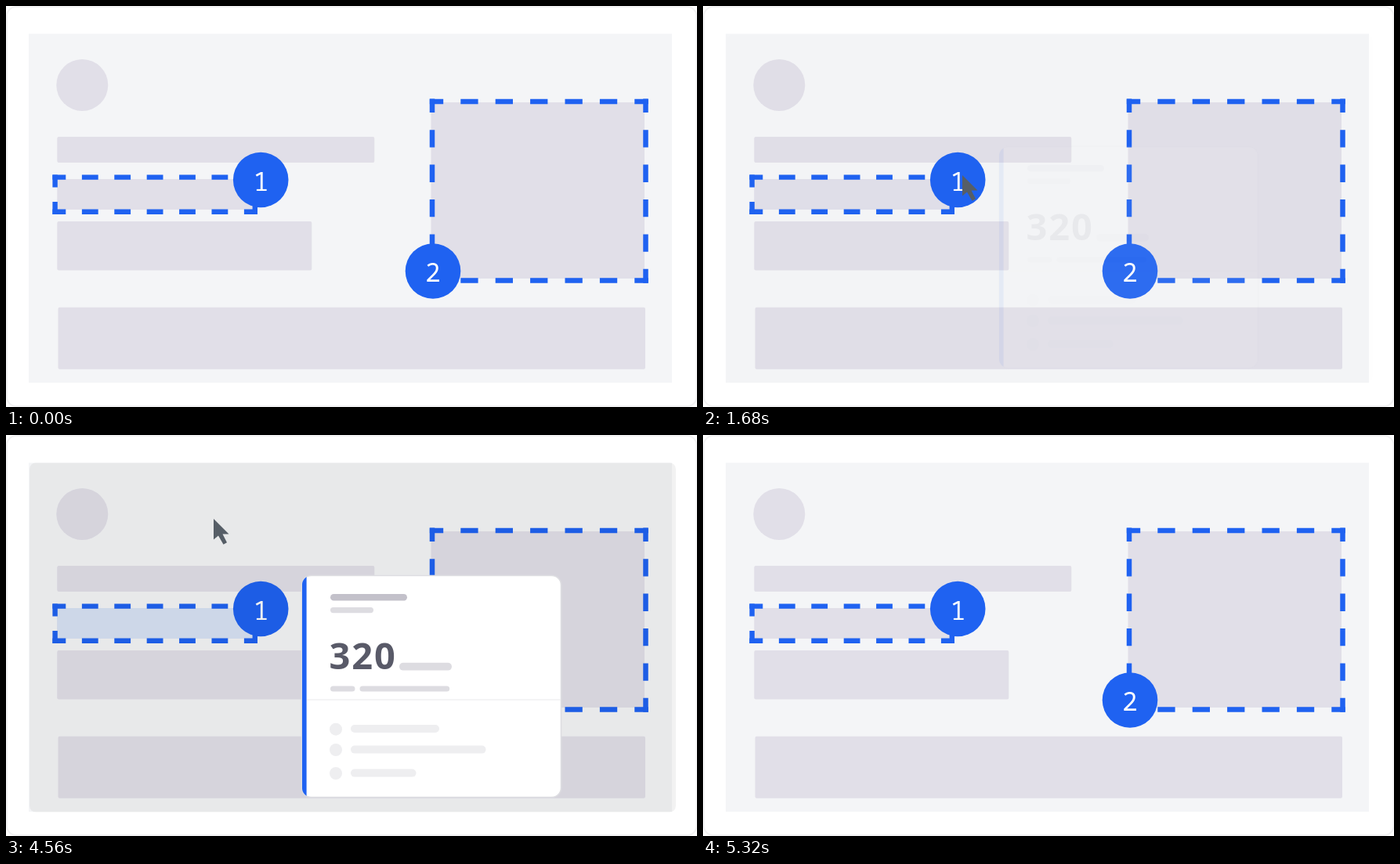
An HTML page that plays this animation: 882x512 px, repeating every 5.36 s.

```html
<!DOCTYPE html>
<html lang="en">
<head>
<meta charset="utf-8">
<title>Hover card</title>
<style>
  html, body { margin: 0; width: 100%; height: 100%; overflow: hidden; background: #fff; }
  svg { display: block; width: 882px; height: 512px; }
  .fill { fill: #e1dfe8; }
  .dash { fill: none; stroke: #1f62f1; }
  .badge circle { fill: #1f62f1; }
  .badge text { fill: #fff; font: 500 33px "Noto Sans Mono", monospace; text-anchor: middle; }
  .total { fill: #595a68; font: 600 47px "Noto Sans", sans-serif; letter-spacing: 1.8px; }
  .mid { fill: #dddce1; }
  .pale { fill: #eeeef0; }
</style>
</head>
<body>
<svg viewBox="0 0 882 512">
  <defs>
    <clipPath id="panelClip"><rect x="29" y="35.5" width="821" height="445.5"/></clipPath>
    <clipPath id="cardClip"><rect x="378" y="180" width="330" height="282" rx="11"/></clipPath>
  </defs>
  <rect x="1" y="1" width="880.5" height="510" rx="12" fill="#fff" stroke="#f2f2f3" stroke-width="2"/>
  <rect x="29" y="35.5" width="821" height="445.5" fill="#f4f5f7"/>

  <g class="fill">
    <circle cx="97.3" cy="101" r="33"/>
    <rect x="65.3" y="167" width="405" height="33" rx="2"/>
    <rect x="65.3" y="221" width="250" height="39" rx="2"/>
    <rect x="65.3" y="275" width="325" height="62.5" rx="2"/>
    <rect x="66.5" y="384.7" width="749.5" height="79" rx="2"/>
    <rect x="542.5" y="123" width="272.5" height="225" rx="2"/>
  </g>
  <rect id="highlight" x="65.3" y="221" width="250" height="39" fill="#d8e2f4"/>

  <g class="dash" stroke-width="6.4">
    <path d="M59.4 218.6H321M59.4 262.8H321" stroke-dasharray="20.8 20.6" stroke-dashoffset="3.9"/>
    <path d="M62.6 215.4V266M317.8 215.4V266" stroke-dasharray="16 18.6"/>
  </g>
  <g class="dash" stroke-width="6.5">
    <path d="M540.8 121.9H819.8M540.8 350.5H819.8" stroke-dasharray="22.3 22.1" stroke-dashoffset="4.9"/>
    <path d="M544 118.6V353.8M816.5 118.6V353.8" stroke-dasharray="22.3 22.1" stroke-dashoffset="4.8"/>
  </g>
  <g class="badge">
    <circle cx="325.2" cy="222" r="35.3"/><text x="325.5" y="235.5">1</text>
    <circle cx="545" cy="338.5" r="35.3"/><text x="545" y="351.8">2</text>
  </g>

  <rect id="dim" x="30" y="35.5" width="825" height="446" rx="8" fill="#0c0c00" fill-opacity=".05"/>

  <g id="card">
    <rect x="377.5" y="179.5" width="331" height="283" rx="12" fill="#fff" stroke="#dddde1" stroke-width="1.6"/>
    <rect x="378" y="180" width="5.6" height="282" fill="#1f62f1" clip-path="url(#cardClip)"/>
    <rect x="384" y="337.3" width="324" height="1.4" fill="#f0f0f1"/>
    <text class="total" x="412.6" y="298.8">320</text>
    <rect x="414" y="203" width="98" height="8.6" rx="4.3" fill="#c3c1ca"/>
    <g class="mid">
      <rect x="414" y="220" width="55" height="7.2" rx="3.6"/>
      <rect x="502" y="290.8" width="67" height="9.8" rx="4.9"/>
      <rect x="414" y="320.4" width="31.5" height="7.2" rx="3.6"/>
      <rect x="451.5" y="320.4" width="114.7" height="7.2" rx="3.6"/>
    </g>
    <g class="pale">
      <circle cx="421" cy="375.7" r="8"/><rect x="440" y="370" width="113" height="10" rx="5"/>
      <circle cx="421" cy="402" r="8"/><rect x="440" y="396.6" width="172.5" height="10" rx="5"/>
      <circle cx="421" cy="432" r="8"/><rect x="440" y="426.6" width="83.5" height="10" rx="5"/>
    </g>
  </g>

  <g clip-path="url(#panelClip)">
    <path id="cursor" d="M0 0V26.5L6 21.5L12.5 32.7L17 30.2L11.5 19.5H19.5Z" fill="#565e67"/>
  </g>
</svg>
<script>
  const LOOP = 5360, STEP = 40;
  const [cursor, card, dim, highlight] =
    ['cursor', 'card', 'dim', 'highlight'].map(id => document.getElementById(id));

  const linear = x => x;
  // cubic-bezier(0, 0, .58, 1), solved by bisection
  const easeOut = x => {
    let lo = 0, hi = 1;
    for (let i = 0; i < 24; i++) {
      const s = (lo + hi) / 2;
      if (1.74 * s * s * (1 - s) + s ** 3 < x) lo = s; else hi = s;
    }
    return 3 * lo * lo * (1 - lo) + lo ** 3;
  };
  const easeIn = x => 1 - easeOut(1 - x);

  const progress = (t, start, length, ease) =>
    ease(Math.min(1, Math.max(0, (t - start) / length)));

  const OUTSIDE = [413, -9], BADGE = [331, 216], REST = [265, 107];
  const moves = [
    { start: 760, length: 460, ease: easeOut, from: OUTSIDE, to: BADGE },
    { start: 4080, length: 460, ease: easeOut, from: BADGE, to: REST },
    { start: 5000, length: 305, ease: easeIn, from: REST, to: OUTSIDE },
  ];

  const fade = (t, showAt, showFor, hideAt, hideFor, ease) =>
    progress(t, showAt, showFor, ease) - progress(t, hideAt, hideFor, ease);

  function draw(t) {
    const move = moves.filter(m => t >= m.start).pop() || moves[0];
    const p = progress(t, move.start, move.length, move.ease);
    const [x, y] = move.from.map((a, i) => a + (move.to[i] - a) * p);
    cursor.setAttribute('transform', `translate(${x} ${y})`);
    card.style.opacity = fade(t, 1640, 200, 4640, 300, easeIn);
    dim.style.opacity = fade(t, 1640, 200, 4840, 200, easeIn);
    highlight.style.opacity = fade(t, 1640, 400, 4640, 400, linear);
  }

  const begin = performance.now();
  function tick() {
    const t = (performance.now() - begin) % LOOP;
    draw(Math.floor(t / STEP) * STEP);
    requestAnimationFrame(tick);
  }
  draw(0);
  requestAnimationFrame(tick);
</script>
</body>
</html>
```
